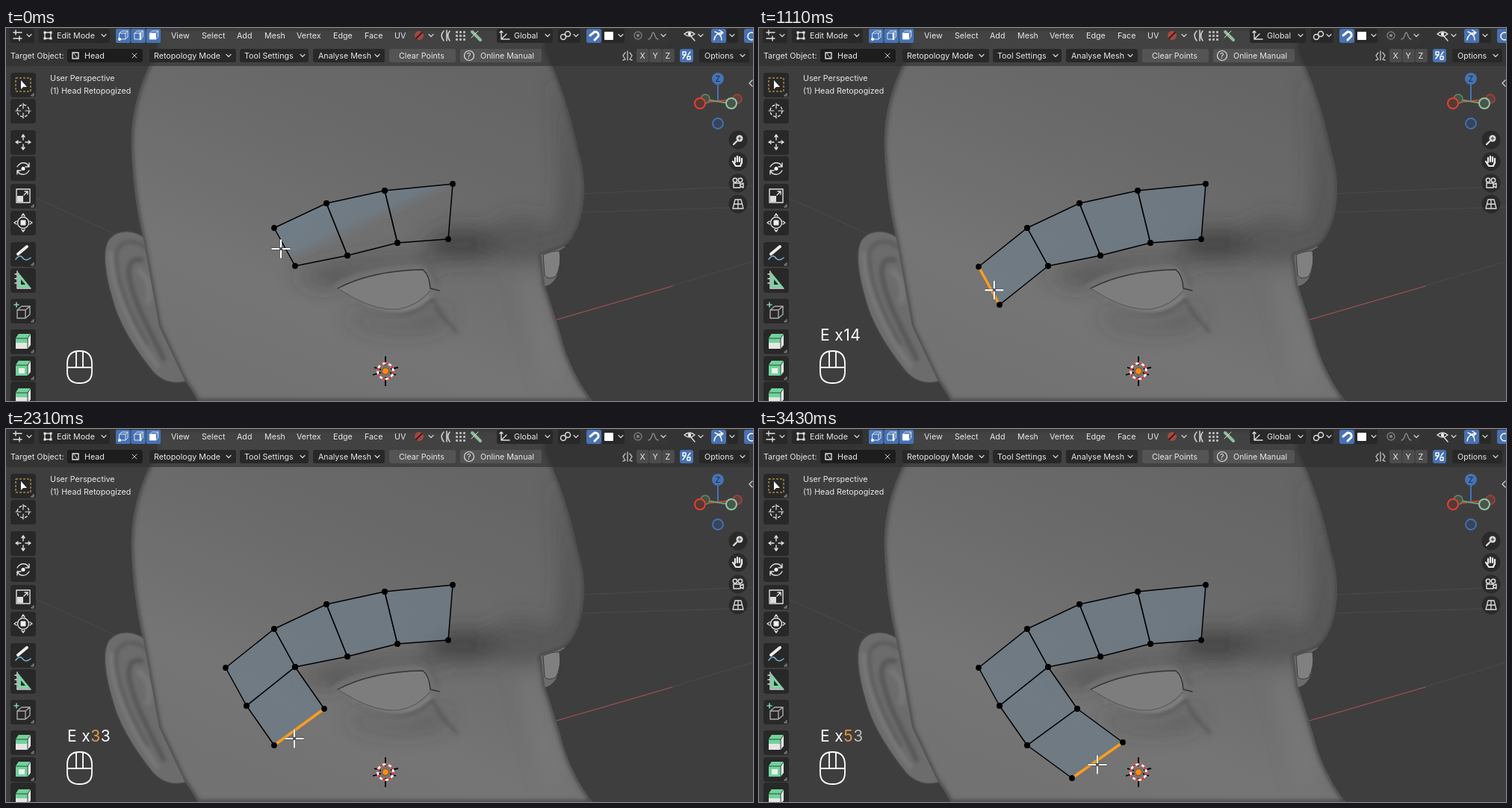
Write an HTML page that moves like this. It is 1000 px wide and 500 px high and loops after 3.47 s.

```html
<!DOCTYPE html>
<html lang="en">
<head>
<meta charset="utf-8">
<title>Edge extrusion</title>
<style>
  html, body { margin: 0; width: 100%; height: 100%; overflow: hidden; background: #3e3e3e; }
  svg { display: block; width: 100%; height: 100%; }
  text { font: 10.7px Inter, sans-serif; fill: #e8e8e8; white-space: pre; }
  #keys { font-size: 21px; letter-spacing: .02em; fill: #fff; }
  .line { fill: none; stroke: #e0e0e0; stroke-width: 1.4; stroke-linecap: round; stroke-linejoin: round; }
  .faces polygon { stroke: #000; stroke-width: 1.5; stroke-linejoin: round; }
</style>
</head>
<body>
<svg viewBox="0 0 1000 500">
  <defs>
    <linearGradient id="skin" gradientUnits="userSpaceOnUse" x1="590" y1="50" x2="400" y2="500">
      <stop stop-color="#656565"/><stop offset=".4" stop-color="#6c6c6c"/>
      <stop offset=".75" stop-color="#757575"/><stop offset="1" stop-color="#727272"/>
    </linearGradient>
    <linearGradient id="partial" gradientUnits="userSpaceOnUse" x1="429" y1="235" x2="452" y2="285">
      <stop stop-color="#71828f" stop-opacity=".75"/><stop offset=".7" stop-color="#71828f" stop-opacity=".6"/>
      <stop offset="1" stop-color="#777" stop-opacity=".2"/>
    </linearGradient>
    <filter id="soft" x="-60%" y="-60%" width="220%" height="220%"><feGaussianBlur stdDeviation="14"/></filter>
    <filter id="fine" x="-30%" y="-30%" width="160%" height="160%"><feGaussianBlur stdDeviation="2.5"/></filter>
    <path id="face" d="M202 0V30C178 75 166 115 168 165C170 212 176 250 184 284L205 400L238 470Q249 486 257 500H785
      C765 475 749 440 742 410C736 390 728 365 721 344L716 304C730 298 742 297 749 291C758 284 765 270 769 255
      C776 228 776 196 766 165C758 125 744 75 722 30V0Z"/>
    <clipPath id="inFace"><use href="#face"/></clipPath>
  </defs>

  <rect width="1000" height="500" fill="#3e3e3e"/>
  <g class="line" style="stroke:#4a4a4a;stroke-width:1">
    <path d="M40 228L172 288M770 247L1000 240M770 222L1000 212M890 346L1000 313"/>
    <path d="M737 391L892 346" stroke="#b65450"/>
  </g>

  <!-- ear -->
  <path d="M190 285C175 270 150 268 138 283C127 299 134 335 142 362C150 395 172 430 196 460Q214 480 240 474L236 400Z" fill="#6c6c6c" stroke="#484848" stroke-width="1.5"/>
  <g fill="none" filter="url(#fine)">
    <path d="M190 296C166 278 146 288 147 310C149 345 166 385 190 425" stroke="#565656" stroke-width="4"/>
    <path d="M184 312C167 305 160 320 167 342C174 375 196 410 212 446" stroke="#555" stroke-width="6"/>
    <path d="M141 300C139 340 165 404 204 455" stroke="#7c7c7c" stroke-width="5"/>
    <path d="M176 324Q197 337 190 370" stroke="#787878" stroke-width="7"/>
  </g>

  <!-- far eye -->
  <path d="M714 303Q730 292 752 292L741 299Q745 320 737 335Q731 345 721 347Z" fill="#6c6c6c" stroke="#3a3a3a" stroke-width="1.2"/>
  <path d="M719 304Q732 298 741 299Q744 318 736 333Q726 338 721 332Z" fill="#808080" stroke="#3a3a3a"/>

  <use href="#face" fill="url(#skin)"/>
  <g clip-path="url(#inFace)">
    <g filter="url(#soft)">
      <path d="M735 60Q785 190 765 285L725 300Q760 230 735 60Z" fill="#404040" opacity=".6"/>
      <ellipse cx="612" cy="290" rx="50" ry="22" fill="#2f2f2f" opacity=".6"/>
      <ellipse cx="690" cy="285" rx="45" ry="32" fill="#404040" opacity=".45"/>
      <path d="M385 335Q470 300 580 308L575 322Q500 310 430 345Z" fill="#3c3c3c" opacity=".55"/>
      <path d="M460 380Q530 415 590 375L585 395Q520 418 465 392Z" fill="#3c3c3c" opacity=".6"/>
      <path d="M698 330L735 470" fill="none" stroke="#828282" stroke-width="22" opacity=".6"/>
    </g>
    <use href="#face" fill="none" stroke="#444" stroke-width="5" filter="url(#fine)"/>
    <!-- near eye -->
    <path d="M432 347Q480 309 550 311Q576 317 580 350L566 367Q535 386 500 380Q465 372 444 349Z" fill="#707070" filter="url(#fine)"/>
    <path d="M444 349Q490 325 558 324Q567 333 567 352Q548 373 522 377Q495 376 466 362Z" fill="#7d7d7d"/>
    <path d="M464 364Q500 383 530 379Q553 374 569 358" fill="none" stroke="#8a8a8a" stroke-width="4" filter="url(#fine)"/>
    <g class="line" style="stroke:#333">
      <path d="M444 349Q490 325 558 324Q567 331 568 349L580 352"/>
      <path d="M444 349L466 362Q498 379 524 377Q551 373 567 353" stroke="#555" stroke-width="1"/>
      <path d="M433 343Q481 315 550 314Q569 316 578 344" stroke="#484848" filter="url(#fine)"/>
      <path d="M466 366Q500 385 535 383Q558 378 571 363L581 383L604 408" stroke="#484848" stroke-width="2" filter="url(#fine)"/>
    </g>
  </g>

  <!-- 3D cursor -->
  <g fill="none" stroke-width="2.6">
    <path d="M508 440V452M508 468V480M491 465L502 462M515 457L525 455M493 455L502 458M514 462L522 465" stroke="#000" stroke-width="1.8"/>
    <circle cx="508" cy="460" r="10.5" stroke="#fff"/>
    <circle cx="508" cy="460" r="10.5" stroke="#dc3030" stroke-dasharray="4.12"/>
    <circle cx="508" cy="460" r="4.3" fill="#ff8c12" stroke="#803c00" stroke-width=".7"/>
  </g>

  <g id="mesh"></g>

  <g class="line" style="stroke:#fff;stroke-width:1.8">
    <path d="M82 450Q82 433 98.500 433Q115 433 115 450V461Q115 476 98.500 476Q82 476 82 461ZM82 455H115M94 434V455M103 434V455"/>
  </g>
  <text id="keys" x="82" y="419"></text>

  <g id="ui"></g>

  <g id="pointer">
    <circle id="press" r="16.500" fill="#cbc327" opacity=".92"/>
    <path d="M-13 0H13M0-13V13" stroke="#222" stroke-width="4" opacity=".35"/>
    <path d="M-12.500 0H-2M2 0H12.500M0-12.500V-2M0 2V12.500" stroke="#fff" stroke-width="2.200"/>
  </g>
</svg>

<script>
const $ = id => document.getElementById(id);
const ui = [];
const box = (x, y, w, h, fill, r = 3) => ui.push(`<rect x="${x}" y="${y}" width="${w}" height="${h}" rx="${r}" fill="${fill}"/>`);
const label = (x, y, s, fill = '#e8e8e8') => ui.push(`<text x="${x}" y="${y}" style="fill:${fill}">${s}</text>`);
const stroke = (d, color = '#e0e0e0', w = 1.4) => ui.push(`<path class="line" d="${d}" style="stroke:${color};stroke-width:${w}"/>`);
const disc = (x, y, r, fill, line = 'none', w = 1.5) => ui.push(`<circle cx="${x}" cy="${y}" r="${r}" fill="${fill}" stroke="${line}" stroke-width="${w}"/>`);
const chevron = (x, y) => stroke(`M${x - 3} ${y - 1.5}l3 3l3-3`, '#ccc', 1.3);
const BLUE = '#4772b3', DARK = '#282828';

function header() {
  ui.push('<rect width="1000" height="51" fill="#303030" opacity=".65"/>');
  box(5, 1, 33, 19, DARK);
  stroke('M10 6H21M10 14H21M13 3V9M18 11V17');
  box(44, 1, 95, 19, DARK);
  stroke('M52 6H60V14H52Z');
  for (const [x, y] of [[52, 6], [60, 6], [52, 14], [60, 14]]) box(x - 1.5, y - 1.5, 3, 3, '#eee', 0);
  label(68, 14, 'Edit Mode');
  for (let i = 0; i < 3; i++) {
    box(147 + i * 20.3, 1, 19.5, 19, BLUE, 2);
    stroke(`M${152 + i * 20.3} 7h8v8h-8zm0 0l3-3h8l-3 3m3-3v8l-3 3`, '#dce6f5', 1);
  }
  disc(152, 15, 2, '#fff');
  stroke('M180 7v8', '#fff', 2.5);
  box(192.600, 7, 8, 8, '#fff', 0);
  [[221, 'View'], [262, 'Select'], [309, 'Add'], [346, 'Mesh'], [389, 'Vertex'], [438, 'Edge'], [480, 'Face'], [520, 'UV']]
    .forEach(([x, s]) => label(x, 14, s));

  disc(553, 10, 6, '#a5483e'); stroke('M549 14L557 6', '#3a2020', 2);
  stroke('M586 4Q580 10 586 17M590 3V17M594 4Q589 10 594 17', '#ccc', 1.6);
  for (let i = 0; i < 9; i++) box(602 + i % 3 * 5, 4 + Math.floor(i / 3) * 5, 3, 3, '#bbb', 1);
  stroke('M624 5L635 16', '#8fc09a', 4); stroke('M623 13L632 4', '#ddd', 1);
  box(657, 1, 75, 19, DARK);
  stroke('M663 4V15H674M663 15L670 8M661 6l2-2l2 2'); label(680, 14, 'Global');
  box(739, 1, 30, 19, DARK);
  disc(746, 12, 3.5, 'none', '#ddd'); disc(752, 8, 3.5, 'none', '#ddd');
  box(777, 1, 20, 19, BLUE); stroke('M782 10L788 5Q794 5 793 11L788 16', '#fff', 3);
  box(798, 1, 30, 19, DARK); box(801, 5, 12, 11, '#fff', 1);
  box(836, 1, 50, 19, '#363636'); disc(846, 10, 5, 'none', '#777'); disc(846, 10, 2, '#888');
  stroke('M860 15Q863 15 865 8Q866 4 868 8Q870 15 873 15', '#888');
  stroke('M908 8Q915 2 922 8Q915 14 908 8M916 10L922 17'); disc(915, 8, 2.2, '#eee');
  box(944, 1, 20, 19, BLUE); stroke('M948 16Q949 7 959 6M955 3L960 6L956 10M949 5Q958 8 958 16', '#fff');
  box(965, 1, 15, 19, DARK); box(988, 1, 20, 19, BLUE); disc(998, 11, 5, 'none', '#fff');

  label(6, 41, 'Target Object:');
  box(82, 28, 101, 18, '#1d1d1d');
  stroke('M89 33V41H97V33Z'); stroke('M90 33L96 41', '#ccc', 1);
  label(105, 41, 'Head'); stroke('M169 34L175 40M175 34L169 40', '#ccc', 1);
  [[192, 116, 198, 'Retopology Mode', DARK], [313, 92, 319, 'Tool Settings', DARK], [411, 96, 418, 'Analyse Mesh', DARK],
   [513, 89, 526, 'Clear Points', '#545454'], [608, 109, 635, 'Online Manual', '#545454'], [928, 67, 935, 'Options', DARK]]
    .forEach(([x, w, tx, s, fill]) => { box(x, 28, w, 18, fill); label(tx, 41, s); });
  disc(620, 37, 6.5, 'none', '#e0e0e0', 1.2); label(617, 41, '?');
  stroke('M832 31V43M829 33L826 37L829 42L826 43M835 33L838 37L835 42L838 43', '#bbb');
  'XYZ'.split('').forEach((s, i) => { box(844 + i * 17.2, 28, 16.5, 18, '#4c4c4c', 2); label(848.500 + i * 17, 41, s); });
  box(902, 28, 18, 18, BLUE); stroke('M906 41L909 37M913 36L916 32M906 32H910V36H906ZM912 38H916V42H912Z', '#fff');
  [31, 131, 569, 725, 763, 823, 880, 930, 972].forEach(x => chevron(x, 10));
  [298, 397, 497, 986].forEach(x => chevron(x, 37));
  label(59, 71, 'User Perspective');
  label(59, 88, '(1) Head Retopogized');
}

function toolbar() {
  [76, 111, 153, 188, 225, 261, 303, 338, 379, 420, 456, 490].forEach(y => box(6, y - 16, 34, 33, DARK, 4));
  [76, 225, 303, 379, 420, 456, 490].forEach(y => stroke(`M37 ${y + 12}v3h-3z`, '#999', 1));
  ui.push('<rect x="13" y="67" width="20" height="18" fill="none" stroke="#e5b657" stroke-dasharray="3 2"/>');
  ui.push('<path d="M20 70V82L23 79H28Z" fill="#fff"/>');
  ui.push('<circle cx="23" cy="111" r="8" fill="none" stroke="#ddd" stroke-width="1.4" stroke-dasharray="4 2.3"/>');
  stroke('M23 101V108M23 114V121M13 111H20M26 111H33', '#e0e0e0', 1.2);
  stroke('M23 144V150M23 156V162M14 153H20M26 153H32M21 146l2-3l2 3M21 160l2 3l2-3M16 151l-3 2l3 2M30 151l3 2l-3 2');
  stroke('M15 186Q20 178 28 182L31 186M31 181V186H26M31 191Q26 199 18 195L15 191M15 196V191H20'); box(20.500, 186, 5, 5, '#fff', 2.5);
  stroke('M14 216H32V234H14ZM24 224L29 219M25 219H29V223'); box(15, 225, 8, 8, '#ddd', 0);
  disc(23, 261, 7.5, 'none', '#ddd', 1.4); box(19.500, 257.500, 7, 7, '#eee', 1);
  stroke('M21 252l2-3l2 3M21 270l2 3l2-3M14 259l-3 2l3 2M32 259l3 2l-3 2');
  stroke('M16 303L28 293', '#eee', 4); stroke('M13 310Q19 302 23 309Q27 313 33 308', '#7bb5d6', 1.6);
  ui.push('<path d="M16 327V348H33Z" fill="#7fd1a5"/>'); ui.push(`<path d="M20 337V344H26Z" fill="${DARK}"/>`);
  stroke('M15 326V349H33M12 330H15M12 336H15M12 342H15');
  stroke('M15 378L21 373H32V384L26 389H15ZM15 378H26V389M26 378L32 373', '#aaa');
  stroke('M14 368V374M11 371H17', '#7fd1a5', 1.6);
  const cube = (y, top) => {
    ui.push(`<path d="M13 ${y - 4}L17 ${y - 10}H33V${y + 5}L29 ${y + 10}H13Z" fill="#e5e5e5"/><path d="M13 ${y - 4}L17 ${y - 10}H33L29 ${y - 4}V${y + top}H13Z" fill="#70d39a"/>`);
    stroke(`M13 ${y - 4}H29L33 ${y - 10}M29 ${y - 4}V${y + 10}`, '#2b4a38', 1);
  };
  cube(420, 2); cube(456, 10); box(17, 456, 8, 7, '#eee', 0); cube(493, 2);
}

function navigation() {
  stroke('M953 98V74', BLUE, 2); stroke('M935 100L978 95', '#c64034', 2); stroke('M938 96L968 101', '#6f9f78', 2);
  disc(936, 95, 6, '#465246', '#668a6c'); disc(979, 95, 6, '#60403d', '#a9443b');
  disc(953, 68, 8, BLUE); label(949.500, 72, 'Z', '#15294a');
  disc(929, 101, 7, '#523a37', '#e83e30', 2); disc(971, 101, 7, '#48564c', '#91c79f', 2); disc(953, 128, 7, '#36445c', BLUE, 1.8);
  [150, 179, 208, 236].forEach(y => disc(980, y, 12.5, '#2a2a2a'));
  disc(982, 148, 4.5, '#ddd'); stroke('M978 152L974 156', '#ddd', 2.4); stroke('M980 148H984M982 146V150', '#333', 1);
  stroke('M976 180V174M979 179V172M982 179V173M985 181V175M973 179L977 185H983L985 180', '#eee', 2.2);
  disc(976, 204, 2.7, 'none', '#ddd'); disc(983, 204, 2.7, 'none', '#ddd'); stroke('M974 208H983V214H974ZM983 210L987 208V214L983 212');
  stroke('M976 230H984L987 242H973ZM975 236H985.500M980 230V242', '#ddd', 1.3);
  stroke('M999 70L995 74L999 78', '#ccc');
}

header(); toolbar(); navigation();
$('ui').innerHTML = ui.join('');

const LOOP = 3470, STEP = 74.4;
// Each key is [step, ...values].
const pointerKeys = [[4, 368, 296], [11, 304, 348], [13, 304, 348], [19, 346, 361], [20, 347, 361], [26, 383, 412],
  [27, 386, 415], [31, 386, 415], [34, 393, 406], [40, 439, 437], [43, 453, 450]];
const extrusions = [
  [[4, 359, 268, 387, 319], [11, 294, 320, 322, 371]],
  [[20, 387, 319, 322, 371], [26, 423, 365, 356, 414], [27, 426, 375, 359, 424]],
  [[34, 426, 375, 359, 424], [40, 470, 406, 402, 454], [43, 487, 420, 419, 468]]
];
const countKeys = [[4, 1], [11, 9], [20, 20], [26, 27], [31, 33], [40, 45], [46, 53]];
const upper = [[359, 268], [429, 235], [507, 218], [598, 209]];
const lower = [[387, 319], [457, 305], [524, 288], [592, 283]];
const smooth = u => u * u * (3 - 2 * u);
const linear = u => u;

function sample(keys, step, ease) {
  const next = keys.findIndex(k => k[0] > step);
  if (next < 0) return keys.at(-1).slice(1);
  if (!next) return keys[0].slice(1);
  const a = keys[next - 1], b = keys[next], u = ease((step - a[0]) / (b[0] - a[0]));
  return a.slice(1).map((v, i) => v + (b[i + 1] - v) * u);
}

function drawMesh(step) {
  const quads = [0, 1, 2].map(i => [upper[i], upper[i + 1], lower[i + 1], lower[i]]);
  const edges = extrusions.map(keys => {
    const [a, b, c, d] = sample(keys, step, smooth);
    return [[a, b], [c, d]];
  });
  extrusions.forEach((keys, i) => {
    const [start, x1, y1, x2, y2] = keys[0];
    if (step > start) quads.push([[x1, y1], ...edges[i], [x2, y2]]);
  });
  const [p, q] = edges[step < 16 ? 0 : step < 34 ? 1 : 2];
  const fill = step ? '#6f7d88" fill-opacity=".78' : 'url(#partial)';
  $('mesh').innerHTML =
    `<g class="faces">${quads.map(pts => `<polygon points="${pts}" fill="${fill}"/>`).join('')}</g>` +
    (step ? `<path d="M${p}L${q}" stroke="#ff9d1c" stroke-width="3.5"/>` : '') +
    quads.flat().map(([x, y]) => `<circle cx="${x}" cy="${y}" r="3.9"/>`).join('');
}

function drawKeys(step) {
  const n = String(Math.round(sample(countKeys, step, linear)[0]));
  const tint = (s, color) => `<tspan style="fill:${color}">${s}</tspan>`;
  const digits = n < 10 ? tint(n, '#8c8c8c')
    : tint(n[0], n < 30 ? '#fff' : '#e09a45') + tint(n[1], n < 50 ? '#fff' : '#bbb');
  $('keys').innerHTML = step ? 'E' + (n > 1 ? ' x' + digits : '') : '';
}

function draw(now) {
  const step = Math.floor((now % LOOP + 12) / STEP);
  drawMesh(step);
  drawKeys(step);
  $('pointer').setAttribute('transform', `translate(${sample(pointerKeys, step, smooth)})`);
  $('press').style.display = [11, 12, 26, 27, 40, 41].includes(step) ? '' : 'none';
}

let begin;
function tick(now) {
  begin ??= now;
  draw(now - begin);
  requestAnimationFrame(tick);
}
draw(0);
requestAnimationFrame(tick);
</script>
</body>
</html>
```
